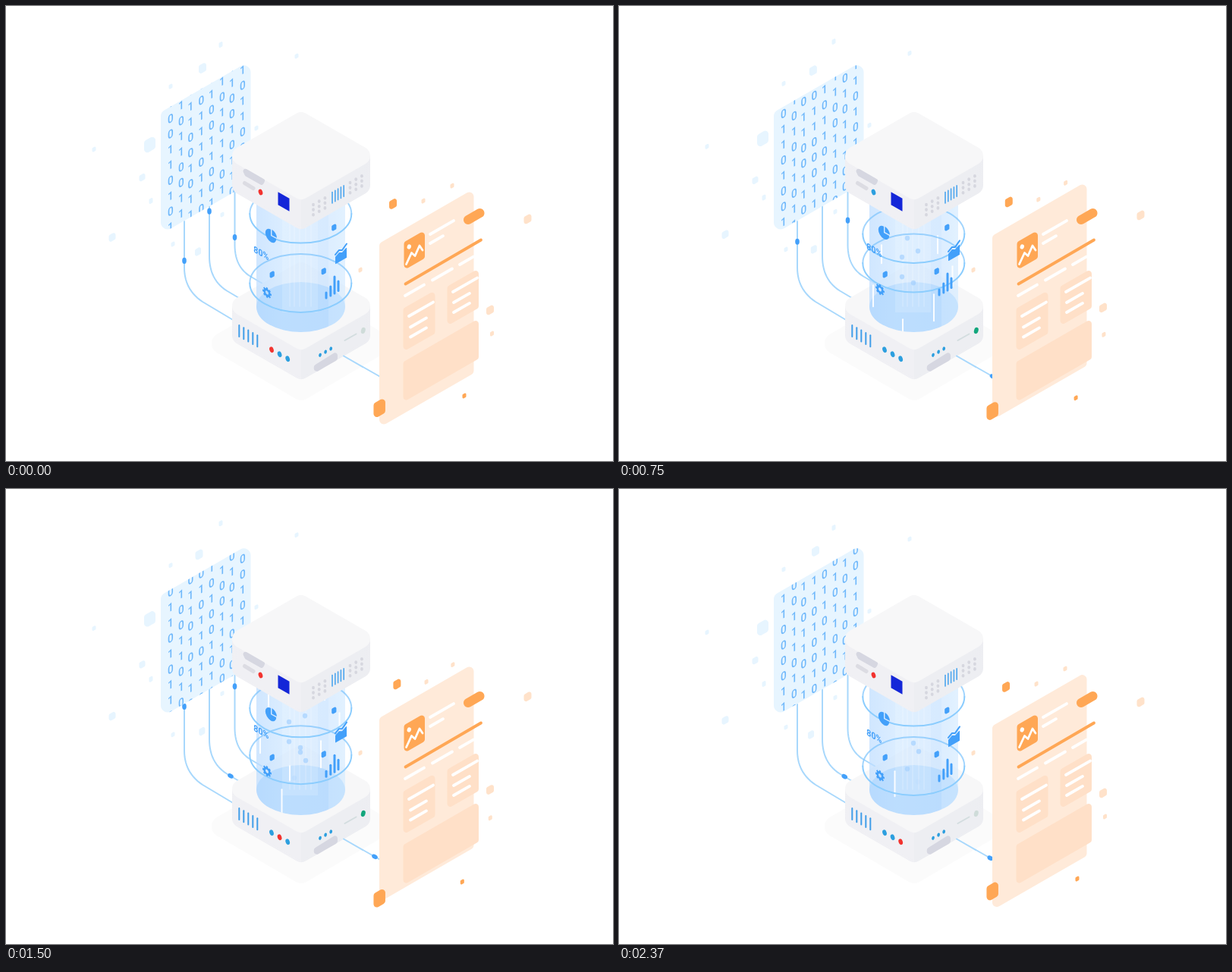
These frames come from a looping animation (800 px wide and 600 px high, 2400 ms). An HTML page with a canvas:

```html
<!DOCTYPE html>
<html lang="en">
<head>
<meta charset="utf-8">
<title>Data server</title>
<style>
html, body { margin: 0; width: 100%; height: 100%; overflow: hidden; background: #fff; }
canvas { display: block; width: 800px; height: 600px; }
</style>
</head>
<body>
<canvas id="stage" width="800" height="600"></canvas>
<script>
const ctx = document.getElementById('stage').getContext('2d');
const LOOP = 2400, SLOPE = 0.577, TAU = Math.PI * 2;
const BLUE = '#43a0fa', SKY = '#e7f5ff', ORANGE = '#ffa755', PEACH = '#ffe2ca', GREY = '#d6d7e1', LED = '#2c9fdf', RED = '#f2332f';

// ---------- helpers ----------
function trace(pts, r) {
  const n = pts.length, last = pts[n - 1];
  ctx.beginPath();
  ctx.moveTo((last[0] + pts[0][0]) / 2, (last[1] + pts[0][1]) / 2);
  pts.forEach((p, i) => ctx.arcTo(p[0], p[1], ...pts[(i + 1) % n], r));
  ctx.closePath();
}
function poly(pts, r, fill) {
  trace(pts, r);
  ctx.fillStyle = fill;
  ctx.fill();
}
// Upright parallelogram on the rising face, from its top left corner.
const slab = (x, y, w, h) => [[x, y], [x + w, y - w * SLOPE], [x + w, y + h - w * SLOPE], [x, y + h]];
const tile = (cx, cy, w, h, fill) =>
  poly(slab(cx - w / 2, cy - h / 2 + w * SLOPE / 2, w, h), w * 0.28, fill);
function line(pts, width, color) {
  ctx.beginPath();
  pts.forEach(p => ctx.lineTo(...p));
  ctx.lineWidth = width;
  ctx.strokeStyle = color;
  ctx.stroke();
}
function oval(x, y, rx, ry, fill, rot = 0) {
  ctx.beginPath();
  ctx.ellipse(x, y, rx, ry, rot, 0, TAU);
  ctx.fillStyle = fill;
  ctx.fill();
}
function onFace(x, y, dir, draw) {
  ctx.save();
  ctx.transform(0.88, dir * 0.5, 0, 1, x, y);
  draw();
  ctx.restore();
}

// ---------- floating tiles: x, y, w, h, dx, dy ----------
const skyTiles = [
  [283, 51, 5, 7, 0, -6.5], [383, 66, 5, 6, 0, -6], [259, 82, 10, 12, -5, 5], [217, 106, 5, 6, 0, -6],
  [189.5, 183, 15, 18, 0, -13], [116, 189, 5, 6, 0, -6], [179.5, 226, 8, 9, 0, 6], [191, 257, 5, 7, 0, -7],
  [140, 305, 9, 10, 0, -6], [220, 314, 5, 6, 0, 11], [253, 324, 8, 10, 6, -5], [285, 275, 5, 6, 0, -6],
  [330, 161, 5, 6, 0, -6]
];
const peachTiles = [
  [550, 257, 5, 6, 4.5, -3], [588, 237, 5, 6, 1, -6], [687.5, 281, 10, 11, 0, -8], [638, 401, 10, 11, 0, -5],
  [640.5, 432, 5, 6, -2.5, 2], [467, 348, 5, 6, 0, 0]
];
const brightTiles = [[510, 261, 10, 12, 6, -4], [604, 514, 5, 6, -3, 4.5]];
const drift = (tiles, fill, w) =>
  tiles.forEach(([x, y, a, b, dx, dy]) => tile(x + dx * w, y + dy * w, a, b, fill));

// ---------- digit columns: x, y, tape ----------
const columns = [
  [217, 148, '11000011010110100110101'], [231, 151, '01110100110101101100110'],
  [243.5, 132, '10011011010110011001011'], [257.5, 124, '11010010110110001110110'],
  [271, 116, '01101101001011010011001'], [285, 99, '01011010011100110101101'],
  [298, 101, '10110010110101110010110'], [312, 84, '00110100101101010110011']
];
function drawDigits(t) {
  const shift = 306 * t / LOOP;
  ctx.save();
  poly(slab(204, 140, 118.5, 161), 9, SKY);
  ctx.clip();
  ctx.font = '500 15.5px Roboto, sans-serif';
  ctx.textAlign = 'center';
  ctx.textBaseline = 'middle';
  ctx.fillStyle = '#6fb8fb';
  for (const [x, y, tape] of columns) {
    for (let k = -2; k < 25; k++) {
      const cy = y + 20.4 * (k - 15) + shift;
      if (cy < 65 || cy > 310) continue;
      onFace(x, cy, -1, () => ctx.fillText(tape[(k + tape.length) % tape.length], 0, 1));
    }
  }
  ctx.restore();
}

// ---------- wires ----------
// A drop, a bend (control and end point) and a run, flattened to points.
function bend(a, b, c, d, e) {
  const pts = [a];
  for (let i = 0; i <= 14; i++) {
    const u = i / 14, v = 1 - u;
    pts.push([0, 1].map(k => v * v * b[k] + 2 * u * v * c[k] + u * u * d[k]));
  }
  return pts.concat([e]);
}
const wires = [
  { pts: bend([235, 284], [235, 345], [235, 374], [259, 390], [300, 414.5]), speed: 0.265, starts: [-195, 650, 1490] },
  { pts: bend([268, 263], [268, 330], [268, 361], [291, 375.5], [312, 388]), speed: 0.187, starts: [-40, 826, 1688] },
  { pts: bend([301.5, 245], [301.5, 315], [301.5, 344], [322, 356.5], [350, 373]), speed: 0.26, starts: [-230, 606, 1442] },
  { pts: [[444, 461], [496, 490.5]], speed: 0.081, starts: [62, 905, 1728] }
];
function drawWires(t) {
  for (const { pts, speed, starts } of wires) {
    line(pts, 2, '#a8d8fc');
    for (const s of starts) {
      let d = (t - s) * speed;
      if (d < 0) continue;
      for (let i = 1; i < pts.length; i++) {
        const [x, y] = pts[i - 1], dx = pts[i][0] - x, dy = pts[i][1] - y, len = Math.hypot(dx, dy);
        if (d <= len) {
          oval(x + dx * d / len, y + dy * d / len, 4.1, 2.8, BLUE, Math.atan2(dy, dx));
          break;
        }
        d -= len;
      }
    }
  }
}

// ---------- server ----------
const rhomb = (cy, hw, hh) => [[389, cy - hh], [389 + hw, cy], [389, cy + hh], [389 - hw, cy]];
function box(cy) {
  for (const [x, w, fill] of [[290, 99, '#f0f0f4'], [389, 100, '#edeef2']]) {
    ctx.save();
    ctx.beginPath();
    ctx.rect(x, cy, w, 110);
    ctx.clip();
    poly(rhomb(cy + 39, 103, 59.5), 12, fill);
    ctx.fillRect(298, cy, 181.5, 39);
    for (let d = 0; d < 39; d += 3) poly(rhomb(cy + d, 103, 59.5), 12, fill);
    ctx.restore();
  }
  poly(rhomb(cy, 103, 59.5), 12, '#f7f7f8');
}
const within = (t, ...spans) => spans.some(([a, b]) => t >= a && t < b);

function drawTopBox(t) {
  box(197.5);
  poly([[309, 210.5], [342, 229.5], [338, 237], [315, 224]], 3, GREY);
  line([[314.5, 233.5], [326, 240.5]], 5, '#dcdce3');
  oval(335.5, 245.5, 2.7, 4, within(t, [0, 600], [1200, 1640], [2160, LOOP]) ? RED : LED, -0.3);
  onFace(366, 258, 1, () => {
    ctx.fillStyle = '#1426d8';
    ctx.fillRect(-8.5, -8.5, 17, 17);
  });
  for (const [gx, gy] of [[405, 262], [453.5, 233]])
    for (let i = 0; i < 9; i++) {
      const c = i % 3;
      oval(gx + c * 7.7, gy - c * 4.4 + Math.floor(i / 3) * 6.6, 1.9, 2.3, '#d6d7df');
    }
  for (let i = 0; i < 5; i++) line([[430 + i * 3.8, 245.5 - i * 2.2], [430 + i * 3.8, 260 - i * 2.2]], 1.6, '#4ba5ee');
}

function drawBottomBox(t) {
  poly(rhomb(445, 132, 77), 14, '#fbfbfb');
  box(395.5);
  for (let i = 0; i < 5; i++) line([[307.3 + i * 6, 421 + i * 3.3], [307.3 + i * 6, 436 + i * 3.3]], 2, '#419ee9');
  const lit = t < 700 ? 0 : t < 800 ? -1 : t < 1600 ? 1 : 2;
  for (let i = 0; i < 3; i++) {
    oval(350 + i * 10.6, 453.3 + i * 6, 2.7, 4, i === lit ? RED : LED, -0.3);
    oval(414 + i * 7.1, 460.3 - i * 4.2, 1.8, 2.6, LED, 0.3);
  }
  poly([[405, 485], [406, 474], [433, 457], [437, 458], [437, 466.5]], 4, GREY);
  line([[446.5, 441], [461.5, 432.5]], 2, '#d3dddf');
  oval(470.8, 428, 2.8, 4.2, within(t, [600, 2000]) ? '#12a67c' : '#cfdcd9', 0.3);
}

// ---------- cylinder ----------
const streaks = [[335, 85, 28], [346, 350, 24], [374, -140, 19], [415, 25, 35], [420, 410, 23], [363.5, 695, 33], [439.5, 210, 26]];
const motes = [[394, 20], [388, -400], [380, 190], [373, -60], [395, 420], [388, 530], [373, -320]];

function drawCylinder(t) {
  ctx.save();
  ctx.beginPath();
  ctx.moveTo(330, 240);
  ctx.lineTo(330, 397);
  ctx.ellipse(388.5, 397, 58.5, 33, 0, Math.PI, 0, true);
  ctx.lineTo(447, 240);
  ctx.closePath();
  ctx.clip();
  const body = ctx.createLinearGradient(330, 0, 447, 0);
  body.addColorStop(0, 'rgba(190,221,255,.72)');
  body.addColorStop(0.3, 'rgba(205,230,255,.72)');
  body.addColorStop(0.8, 'rgba(199,226,255,.72)');
  body.addColorStop(1, 'rgba(208,232,255,.72)');
  ctx.fillStyle = body;
  ctx.fillRect(330, 240, 117, 192);
  oval(388.5, 397, 58.5, 33, 'rgba(167,211,255,.55)');
  ctx.fillStyle = 'rgba(255,255,255,.14)';
  ctx.fillRect(364, 240, 47, 164);
  ctx.fillRect(425, 240, 22, 190);
  for (const x of [374, 380, 387, 395, 402]) line([[x, 250], [x, 396]], 1.5, 'rgba(255,255,255,.22)');

  for (const [x, start] of motes)
    for (let k = 0; k < 2; k++) {
      const age = t - start - k * 990, y = 250 + age * 0.1;
      if (age < 0 || y > 390) continue;
      ctx.globalAlpha = Math.min(1, t / 700, (390 - y) / 25) * 0.6;
      oval(x, y, 3.2, 3.4, '#9accff');
    }
  ctx.globalAlpha = 1;
  for (const [x, start, len] of streaks) {
    const age = t - start;
    if (age < 0 || age >= 1980) continue;
    const y = 235 + (age % 990) * 0.2;
    line([[x, y], [x, y + len]], 2, 'rgba(255,255,255,.92)');
  }
  ctx.restore();
}

function drawRings(t) {
  const swing = 45.7 * Math.cos(TAU * (t + 15) / LOOP);
  ctx.lineWidth = 2;
  for (const y of [319.75 - swing, 319.75 + swing])
    for (const back of [true, false]) {
      ctx.beginPath();
      ctx.ellipse(388.3, y, 67, 38.5, 0, 0, Math.PI, back);
      ctx.strokeStyle = back ? 'rgba(125,196,253,.7)' : '#8ccdfe';
      ctx.stroke();
    }
}

function drawIcons(w) {
  const lift = -6.5 * w;
  for (const [x, y] of [[432.3, 292], [418.7, 349.7], [350.7, 354]]) tile(x, y, 6.2, 8, BLUE);

  onFace(349, 303 + lift, 1, () => {
    ctx.fillStyle = BLUE;
    ctx.beginPath();
    ctx.moveTo(0, 0);
    ctx.arc(0, 0, 8.2, 0, Math.PI * 1.5);
    ctx.fill();
    ctx.beginPath();
    ctx.moveTo(1.6, -1.6);
    ctx.arc(1.6, -1.6, 7.4, -Math.PI / 2, 0);
    ctx.fill();
  });

  onFace(336.3, 326 + lift, 1, () => {
    ctx.font = '700 12px Roboto, sans-serif';
    ctx.textAlign = 'center';
    ctx.textBaseline = 'middle';
    ctx.fillStyle = BLUE;
    ctx.fillText('80%', 0, 0.5);
  });

  onFace(344, 378 + lift, 1, () => {
    ctx.strokeStyle = ctx.fillStyle = BLUE;
    ctx.lineWidth = 3;
    ctx.beginPath();
    ctx.arc(0, 0, 3.8, 0, TAU);
    ctx.stroke();
    for (let i = 0; i < 8; i++) {
      ctx.rotate(TAU / 8);
      ctx.fillRect(-1.3, -6.7, 2.6, 3);
    }
  });

  const y = lift;
  poly([[434, 331 + y], [439, 325 + y], [443, 325 + y], [449, 318 + y], [449, 332 + y], [434, 340.5 + y]], 0.5, BLUE);
  line([[434, 328 + y], [439, 322 + y], [443, 322 + y], [449, 313.5 + y]], 2, BLUE);

  [[422, 377, 386], [427.8, 369, 383], [433, 356, 380], [438, 362, 376.5]].forEach(([x, a, b]) => {
    line([[x, a + 1 + lift], [x, b - 1 + lift]], 3, BLUE);
  });
}

// ---------- page ----------
function drawPage(t) {
  const rise = -12 * Math.sin(Math.PI * t / LOOP);
  poly(slab(492, 313 + rise, 124.5, 243), 6, '#ffead9');
  const panel = '#ffe0c8';
  poly(slab(523.5, 399, 42, 57), 4, panel);
  poly(slab(581.5, 370, 41.5, 52), 4, panel);
  poly(slab(523.5, 469.5, 99.5, 53), 4, panel);

  poly(slab(524.5, 311.5, 27.5, 37), 4, ORANGE);
  oval(531.3, 317.5, 2.6, 3.2, '#fff', 0.3);
  line([[527.5, 340.5], [534.5, 325.5], [539, 329.5], [545, 316], [549, 322]], 2.8, '#fff');

  const rules = [
    [559, 301, 31], [559, 313, 17], [526, 382, 25], [562, 361.5, 26], [598, 341, 18],
    [531, 409, 32], [533, 423.5, 21], [533, 436.5, 21], [589, 377, 32], [590, 391, 21], [590, 404, 21]
  ];
  for (const [x, y, w] of rules) line([[x, y], [x + w, y - w * SLOPE]], 3.8, '#fff');
  line([[526.5, 366.5], [626, 308.5]], 3.8, ORANGE);

  poly(slab(603, 278.5, 27.5, 14), 6, ORANGE);
  const sway = (1 - Math.cos(TAU * (t - 200) / LOOP)) / 2;
  tile(492.2, 529.5 + 10.5 * sway, 15.5, 21, ORANGE);
}

function render(t) {
  const w = (1 - Math.cos(TAU * (t - 50) / LOOP)) / 2;
  ctx.clearRect(0, 0, 800, 600);
  ctx.lineCap = ctx.lineJoin = 'round';
  drift(skyTiles, SKY, w);
  drawWires(t);
  drawDigits(t);
  drawBottomBox(t);
  // The outgoing wire leaves from the face of the lower box.
  line([[445, 461.5], [470, 475.8]], 2, '#a8d8fc');
  drawCylinder(t);
  drawRings(t);
  drawIcons(w);
  drawTopBox(t);
  drift(peachTiles, PEACH, w);
  drawPage(t);
  drift(brightTiles, ORANGE, w);
}

const begin = performance.now();
function tick() {
  render((performance.now() - begin) % LOOP);
  requestAnimationFrame(tick);
}
tick();
</script>
</body>
</html>
```
